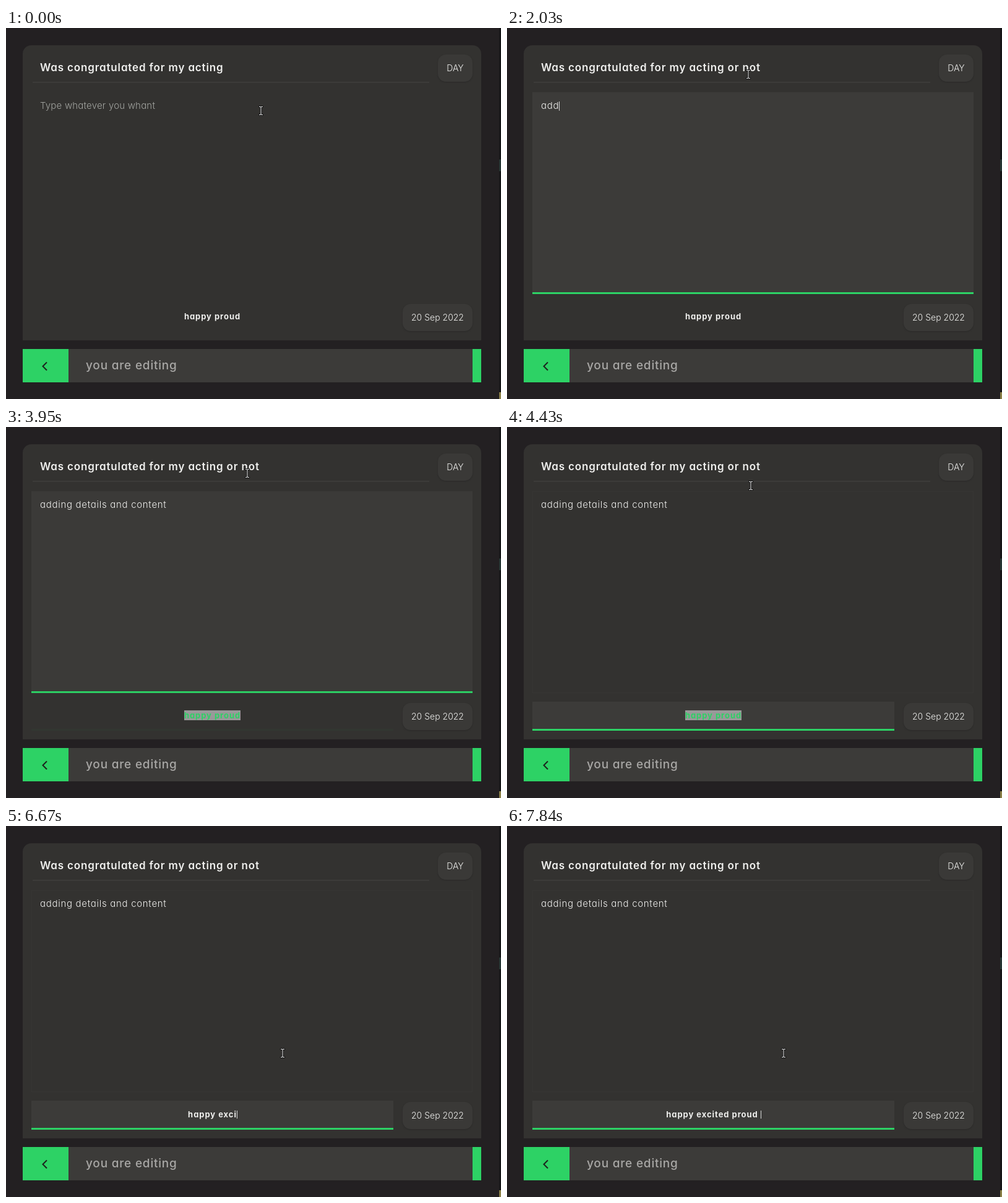
Animation, 800 px wide and 601 px high, one loop 8 s. Source, as an HTML page:

```html
<!DOCTYPE html>
<html lang="en">
<head>
<meta charset="utf-8">
<title>Diary entry</title>
<style>
html, body { margin: 0; width: 100%; height: 100%; overflow: hidden; background: #232022; }
body { position: relative; font: 300 15px Inter, sans-serif; font-feature-settings: "cv11"; color: #f0f0ee; }
div, svg { position: absolute; box-sizing: border-box; }
#card { left: 27px; top: 28px; width: 741px; height: 478px; background: #333230; border-radius: 14px 14px 0 0; }
.button { background: #3a3937; border-radius: 13px; box-shadow: 0 1px 2px #2a2928; height: 44px; line-height: 43px; font-size: 14px; text-align: center; }
#day { left: 698px; top: 43px; width: 56px; }
#date { left: 641px; top: 447px; width: 113px; }
.focus { inset: 0; background: #3c3b39; border-bottom: 3px solid #2dd265; }
.text { left: 14px; right: 14px; white-space: pre; }
#title { left: 41px; top: 42px; width: 643px; height: 48px; }
#title::before { content: ""; position: absolute; left: 2px; right: 0; top: 45px; height: 2px; background: #3c3b39; }
#title .focus { border-radius: 10px 10px 0 0; }
#title .text { font-size: 17px; font-weight: 600; letter-spacing: .85px; line-height: 44px; }
#body { left: 41px; top: 104px; width: 713px; height: 327px; }
#body .text { top: 10px; line-height: 23px; letter-spacing: .7px; }
#body .text.empty { color: #a3a5a1; letter-spacing: .2px; }
#mood { left: 41px; top: 445px; width: 585px; height: 47px; }
#mood .text { top: 15px; line-height: 14px; font-size: 13px; font-weight: 700; letter-spacing: .95px; text-align: center; }
.selected { background: #999; color: #2dd265; }
.caret { display: inline-block; width: 1px; height: 15px; margin-right: -1px; background: #d8d8d8; vertical-align: -3px; }
#mood .caret { height: 13px; vertical-align: -2px; }
#bar { left: 27px; top: 520px; width: 741px; height: 54px; background: #3c3b39; border: solid #2dd265; border-width: 0 14px 0 74px; }
#bar div { left: 28px; top: 0; white-space: pre; line-height: 53px; font-size: 19px; font-weight: 500; letter-spacing: .8px; color: #a9a8a6; }
#edge { left: 797px; top: 0; width: 3px; height: 601px; background: linear-gradient(#161617 213px, #263634 213px 232px, #161617 232px 590px, #8a8048 590px); }
#mouse { left: 0; top: 0; }
</style>
</head>
<body>
<div id="card"></div>
<div id="title"><div class="focus"></div><div class="text"></div></div>
<div id="body"><div class="focus"></div><div class="text"></div></div>
<div id="mood"><div class="focus"></div><div class="text"></div></div>
<div id="day" class="button">DAY</div>
<div id="date" class="button">20 Sep 2022</div>
<div id="bar"><div>you are editing</div></div>
<svg style="left:55px;top:538px" width="16" height="20"><path d="M11 3.5 4.5 10 11 16.5" fill="none" stroke="#1c211d" stroke-width="2"/></svg>
<div id="edge"></div>
<svg id="mouse" width="12" height="18" fill="none" stroke-linecap="square">
  <defs><path id="beam" d="M3.5 2.5H5L6 3.2 7 2.5H8.5M6 3.5V14.5M3.5 15.5H5L6 14.8 7 15.5H8.5"/></defs>
  <use href="#beam" stroke="#161616" stroke-width="3"/>
  <use href="#beam" stroke="#eee"/>
</svg>
<script>
const LOOP = 8000;
const CARET = '<span class="caret"></span>';
const get = id => document.getElementById(id);
const ramp = (t, from, to) => Math.min(1, Math.max(0, (t - from) / (to - from)));
const ease = x => x * x * (3 - 2 * x);
const mix = (a, b, k) => a + (b - a) * k;

// Characters of `word` whose key time has passed
const typed = (t, word, keys) => word.slice(0, keys.filter(k => k <= t).length);

const titleKeys = [910, 960, 1010, 1010, 1070, 1120, 1230];
const bodyKeys = [1870, 1930, 2030, 2130, 2190, 2290, 2400, 2450,
  2610, 2660, 2720, 2770, 2770, 2830, 2880, 3040];
for (let i = 0; i < 10; i++) bodyKeys.push(3120 + i * 74);
const moodKeys = [5070, 5120, 5170, 5490, 5550, 5650, 6190, 6510, 6560, 6670, 6720,
  6930, 7040, 7200, 7470, 7520, 7630, 7790, 7840, 7840];

const fields = {
  title: { on: 550, off: 1440, text: t => 'Was congratulated for my acting' + typed(t, ' or not', titleKeys) },
  body: { on: 1440, off: 3930, text: t => typed(t, 'adding details and content', bodyKeys) },
  mood: { on: 3930, off: 9000, text: t => t < 5070 ? 'happy proud' : typed(t, 'happy excited proud ', moodKeys) }
};

function drawField(id, t) {
  const { on, off, text } = fields[id];
  const [glow, label] = get(id).children;
  const active = t >= on && t < off;
  const selected = id === 'mood' && active && t < 5070;
  const blink = t >= 6030 && t < 6190;
  const value = text(t);
  const empty = !value;
  glow.style.opacity = ease(ramp(t, on, on + 220)) * (1 - ease(ramp(t, off, off + 220)));
  label.className = empty ? 'text empty' : 'text';
  const shown = empty ? 'Type whatever you whant' : value;
  const caret = active && !selected && !blink ? CARET : '';
  label.innerHTML = selected ? `<span class="selected">${shown}</span>`
    : empty ? caret + shown : shown + caret;
}

function draw(now) {
  const t = now % LOOP;
  for (const id in fields) drawField(id, t);
  // A faint outline remains once the text area has been left
  get('body').style.boxShadow = t > 4100 ? 'inset 0 0 0 1px #373634' : 'none';
  const a = ease(ramp(t, 50, 520)), b = ease(ramp(t, 4370, 4750));
  const x = mix(mix(412, 390, a), 446.5, b);
  const y = mix(mix(133.5, 75, a), 367.5, b);
  get('mouse').style.transform = `translate(${Math.round(x - 6)}px, ${Math.round(y - 9)}px)`;
  requestAnimationFrame(draw);
}
draw(0);
</script>
</body>
</html>
```
